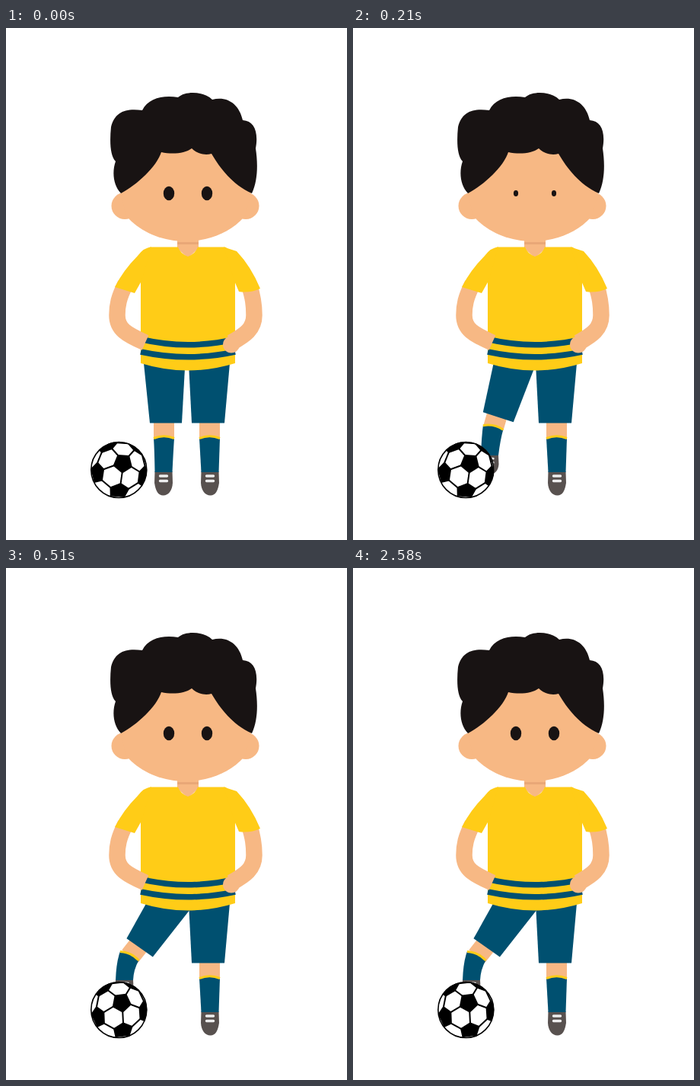
An HTML page that plays this animation: 448x672 px, repeating every 2700 ms.

```html
<!DOCTYPE html>
<html lang="en">
<head>
<meta charset="utf-8">
<style>
  html, body { margin: 0; width: 100%; height: 100%; overflow: hidden; background: #fff; }
  svg { display: block; width: 100vw; height: 100vh; }
  .skin { fill: #f7b884; }
  .limb { fill: none; stroke: #f7b884; }
  .yellow { fill: #ffcc17; }
  .navy { fill: #005070; }
  .stripe { fill: none; stroke: #005070; stroke-width: 7.5; }
  .band { fill: none; stroke: #ffcc17; stroke-width: 3; }
  .hair { fill: #181313; }
  .shoe { fill: #58514f; }
  .lace { stroke: #eee; stroke-width: 3.4; stroke-linecap: round; }
</style>
</head>
<body>
<svg viewBox="0 0 448 672">
  <defs>
    <g id="shoe">
      <path class="shoe" d="M-12-1H11L11.5 14C11 24 6 30.500-1 30.500S-11 24-12.500 14Z"/>
      <path class="lace" d="M-5 5H4M-5 11.500H4"/>
    </g>
    <path id="band" class="band" d="M-13.500 2Q0-3.500 13.500 2"/>
    <clipPath id="rim"><circle r="37"/></clipPath>
  </defs>

  <path class="skin" d="M254 510H281V540H254Z"/>
  <g transform="translate(267.500 536.500) scale(-1 1)">
    <use href="#shoe" y="46.500"/>
    <path class="navy" d="M-13.500 2Q0-4 13.500 2L11 46.500H-12Z"/>
    <use href="#band"/>
  </g>
  <path class="navy" d="M240 440L244 518.500H287L294 440Z"/>

  <path id="shin" class="limb" stroke-width="27"/>
  <use id="kickShoe" href="#shoe"/>
  <path id="kickSock" class="navy"/>
  <use id="kickBand" href="#band"/>
  <path id="thigh" class="navy" d="M181 440L189 518.500H231L236 428Z"/>

  <path class="skin" d="M225 270H253V289L239 302L225 289Z"/>
  <path d="M225 282.500H253" stroke="#e9a777" stroke-width="3"/>
  <path class="yellow" d="M189 287.500H226Q229 296 239 300Q249 296 252 287.500H288L301 296V440Q239 459 177 440V296Z"/>
  <path class="stripe" d="M177 408.500Q239 423 301 408.500M177 425Q239 438.500 301 425"/>
  <g class="limb" stroke-width="21.500">
    <path d="M157 336C148 354 146 364 146 377C146 395 158 402 183 413"/>
    <path d="M319 336C325 354 326 364 326 377C326 395 314 403 296 413"/>
  </g>
  <circle class="skin" cx="296" cy="415.500" r="11"/>
  <path class="yellow" d="M191 287.500Q181 288 173 299Q154 318 143 340L169 348L178 332ZM286 287.500L303 293Q322 313 334 342Q321 348 306 346L300 332Z"/>

  <g class="skin">
    <circle cx="156" cy="233.500" r="17.500"/>
    <circle cx="315" cy="233.500" r="17.500"/>
    <path d="M151 216L200 150H275L322 216L315 245C300 265 270 280 236 280S172 265 157 245Z"/>
  </g>
  <path class="hair" d="M151 217C141 207 139 189 144 175C137 168 136 150 138 130C143 110 157 105 179 108C187 92 206 88 226 91C236 82 260 83 271 94C290 89 306 99 311 121C326 122 332 136 328 158C331 178 331 200 323 217C297 205 282 185 270 165C260 168 250 164 244 158C235 165 218 166 204 163C198 182 172 206 151 217Z"/>
  <g class="hair">
    <ellipse class="eye" cx="214" cy="217"/>
    <ellipse class="eye" cx="264" cy="217"/>
  </g>

  <g transform="translate(148.300 580)">
    <circle r="37" fill="#fff"/>
    <g clip-path="url(#rim)"><g id="ball"></g></g>
    <circle r="36.500" fill="none" stroke="#000" stroke-width="1.600"/>
  </g>
</svg>
<script>
const $ = id => document.getElementById(id);
const LOOP = 2700, RAD = Math.PI / 180, HIP = [224.7, 454];

// time, thigh angle, sock tilt, sock top x/y, ankle x/y, ball spin
const POSES = [
  [0, 0, 0, 207.5, 536.5, 207.5, 583, 0],
  [90, 7, 3, 198.5, 531, 197.5, 574, 0],
  [210, 18, 12, 184.5, 522.5, 180, 561, 0],
  [330, 27, 18, 173, 514, 166, 551, 0],
  [510, 35, 25, 163, 507.5, 156, 541, -11]
];

// Points on a sphere (polar angle, azimuth) seen slightly from below
function project([polar, azimuth]) {
  const r = Math.sin(polar * RAD), z = Math.cos(polar * RAD);
  const x = 37 * (r * Math.cos(azimuth * RAD) + 0.15 * z);
  const y = 37 * (r * Math.sin(azimuth * RAD) - 0.25 * z);
  return x.toFixed(1) + ' ' + y.toFixed(1);
}
const line = points => 'M' + points.map(project).join('L');

function buildBall() {
  const corners = [0, 1, 2, 3, 4].map(i => 22 + i * 72);
  let patches = line(corners.map(a => [19, a])) + 'Z', seams = '';
  for (const a of corners) {
    patches += line([[42.5, a], [58, a + 22], [82, a + 14], [82, a - 14], [58, a - 22]]) + 'Z';
    seams += line([[19, a], [42.5, a]]) + line([[58, a + 22], [58, a + 50]]);
  }
  $('ball').innerHTML = `<path d="${patches}" stroke="#000" stroke-width="2" stroke-linejoin="round"/>
    <path d="${seams}" stroke="#000" stroke-width="2"/>`;
}

function poseAt(t) {
  const i = POSES.findIndex(p => p[0] > t);
  if (i < 0) return POSES.at(-1);
  const a = POSES[i - 1], b = POSES[i], k = (t - a[0]) / (b[0] - a[0]);
  return a.map((v, n) => v + (b[n] - v) * k);
}

// Eye size: shrinks to nothing at `shut`, then grows back
function blink(t, start, shut, end) {
  if (t < start || t > end) return 1;
  return t < shut ? (shut - t) / (shut - start) : (t - shut) / (end - shut);
}

function drawLeg([, angle, tilt, x, y, ankleX, ankleY]) {
  const c = Math.cos(angle * RAD), s = Math.sin(angle * RAD);
  const dx = 207.5 - HIP[0], dy = 508 - HIP[1];
  const kneeX = HIP[0] + dx * c - dy * s, kneeY = HIP[1] + dx * s + dy * c;
  $('thigh').setAttribute('transform', `rotate(${angle} ${HIP})`);
  $('shin').setAttribute('d', `M${kneeX} ${kneeY}L${x} ${y + 2}`);

  // The sock bends: along its tilt at the top, upright at the ankle
  const u = Math.cos(tilt * RAD), v = Math.sin(tilt * RAD);
  const at = (across, down) => [x + across * u - down * v, y + across * v + down * u];
  $('kickSock').setAttribute('d', `M${at(-13.5, 2)}Q${at(0, -4)} ${at(13.5, 2)}
    Q${at(12.5, 16)} ${ankleX + 11} ${ankleY}H${ankleX - 12}Q${at(-12.5, 16)} ${at(-13.5, 2)}`);
  $('kickBand').setAttribute('transform', `translate(${x} ${y}) rotate(${tilt})`);
  $('kickShoe').setAttribute('transform',
    `translate(${ankleX} ${ankleY}) scale(1 ${(ankleY - y) / 46.5})`);
}

function draw(t) {
  const pose = poseAt(t);
  drawLeg(pose);
  $('ball').setAttribute('transform', `rotate(${pose[7]})`);
  const open = blink(t, 0, 120, 330) * blink(t, 2190, 2370, 2580);
  for (const eye of document.querySelectorAll('.eye')) {
    eye.setAttribute('rx', 7.2 * open);
    eye.setAttribute('ry', 9.3 * open);
  }
}

function tick() {
  draw(Math.floor(performance.now() % LOOP / 30) * 30);
  requestAnimationFrame(tick);
}
buildBall();
tick();
</script>
</body>
</html>
```
